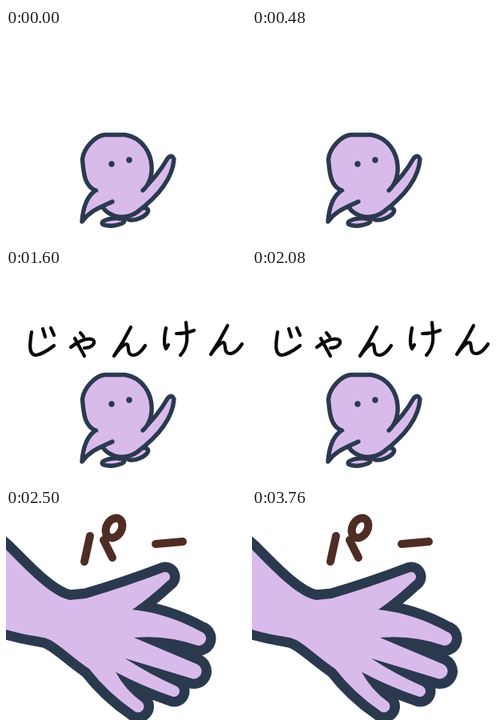
An HTML page for the animation above (4600 ms loop, 300 px wide and 265 px high).

```html
<!DOCTYPE html>
<html lang="ja">
<head>
<meta charset="utf-8">
<title>じゃんけん</title>
<style>
  html, body { margin: 0; width: 100%; height: 100%; overflow: hidden; background: #fff; }
  svg { display: block; width: 100vw; height: 100vh; stroke-linecap: round; stroke-linejoin: round; }
  .skin { fill: #d9bbeb; stroke: #2b394f; stroke-width: 5.4; }
  .dark { fill: #2b394f; }
  .light { fill: #d9bbeb; }
  .ink { fill: none; stroke: #080808; stroke-width: 4.2; }
  .brown { fill: none; stroke: #4f2d24; stroke-width: 10; }
  .palm { fill: #d9bbeb; stroke: #2b394f; stroke-width: 25; paint-order: stroke; }
  .scene { visibility: hidden; animation: 4600ms step-end infinite; }
  .up { animation-name: up; }
  .out { animation-name: out; }
  .jan { animation-name: jan; }
  .ken { animation-name: ken; }
  .rush { animation-name: rush; }
  .open { animation-name: open; }
  @keyframes up {
    0%, 34.7826% { visibility: visible; }
    17.3913%, 52.1739%, 100% { visibility: hidden; }
  }
  @keyframes out {
    0%, 34.7826%, 100% { visibility: hidden; }
    17.3913% { visibility: visible; }
  }
  @keyframes jan {
    0%, 52.1739%, 100% { visibility: hidden; }
    17.3913% { visibility: visible; }
  }
  @keyframes ken {
    0%, 52.1739%, 100% { visibility: hidden; }
    34.7826% { visibility: visible; }
  }
  @keyframes rush {
    0%, 54.3478%, 100% { visibility: hidden; }
    52.1739% { visibility: visible; }
  }
  @keyframes open {
    0% { visibility: hidden; }
    54.3478%, 100% { visibility: visible; }
  }
</style>
</head>
<body>
<svg viewBox="0 0 300 265" preserveAspectRatio="none">
  <defs>
    <g id="feet" class="skin">
      <ellipse cx="134" cy="242.5" rx="14" ry="4.5" transform="rotate(-6 134 242.5)"/>
      <ellipse cx="164.5" cy="232.5" rx="14" ry="6" transform="rotate(-22 164.5 232.5)"/>
    </g>
    <g id="head">
      <path class="skin" d="M112 203C99 198 97 184 95.5 164C97 150 112 134 124 133.5H149C171 137 181 157 182 172C183 184 179 196 171 203"/>
      <circle class="dark" cx="132" cy="170" r="3.7"/>
      <circle class="dark" cx="154" cy="165" r="3.7"/>
    </g>
    <path id="wing" class="skin" d="M112 203Q97 213 95 242C106 228 116 225 133 217"/>
    <path id="n" d="M156 74Q147 92 135 110Q148 92 152 96C154 101 151 109 160 109Q167 108 174 97"/>
  </defs>

  <g class="scene up">
    <use href="#feet"/>
    <path class="skin" d="M171 202Q190 184 202 163Q207 157 210 164C208 190 188 212 164 230C150 240 130 238 120 223L112 203"/>
    <use href="#head"/>
    <use href="#wing"/>
  </g>

  <g class="scene out">
    <use href="#feet"/>
    <path class="skin" d="M173 203Q198 202 220 193Q228 192 227 198C210 211 194 211 181 218C160 240 136 242 120 223L112 203"/>
    <use href="#head" x="2.5"/>
    <use href="#wing"/>
  </g>

  <g class="scene jan ink" role="img" aria-label="じゃん">
    <path d="M32 80C29 98 29 108 37 109Q46 108 60 97M46 76L49 86M56 75L60 84"/>
    <path d="M81 99Q97 87 107 89C114 91 109 100 98 100M93 81L97 86M86 88L98 110"/>
    <use href="#n"/>
  </g>
  <g class="scene ken ink" role="img" aria-label="けん">
    <path d="M200 75Q196 94 200 101L203 96M213 82Q225 82 235 78M225 68C227 88 228 98 218 109"/>
    <use href="#n" x="121" y="-2"/>
  </g>

  <g class="scene rush">
    <path class="dark fray" d="M-12 13H80C112 16 127 55 127 85C126 112 110 129 85 130C84 155 65 168 50 168C30 178 10 182-12 181"/>
    <path class="light fray" d="M-12 36C20 28 60 24 78 29C98 38 106 55 111 82C110 104 98 108 88 106L65 94H82Q74 78 56 75Q35 63 9 64L14 74L56 111Q72 126 68 142Q55 160 28 135L-12 105"/>
    <path class="light fray" d="M-12 118L10 132Q30 150 44 154Q30 160-12 140"/>
    <path class="light fray" d="M-12 148Q10 152 28 164Q10 168-12 163"/>
    <circle class="dark" cx="62" cy="64" r="4"/>
    <circle class="dark" cx="78" cy="92" r="4"/>
  </g>

  <g class="scene open">
    <path id="hand" class="palm"/>
    <g class="brown" role="img" aria-label="パー">
      <path d="M105 35L98 67M122 40L133 62M187 45L221 42"/>
      <ellipse cx="135" cy="25" rx="9.5" ry="13" transform="rotate(28 135 25)"/>
    </g>
  </g>
</svg>
<script>
  // One finger: a bent side, a round tip of radius r, and a bent side to the next gap.
  function finger(from, to, { tip: [x, y], r, bend }) {
    const dx = x - (from[0] + to[0]) / 2, dy = y - (from[1] + to[1]) / 2;
    const len = Math.hypot(dx, dy);
    const nx = dy / len, ny = -dx / len;
    const a = [x + nx * r, y + ny * r], b = [x - nx * r, y - ny * r];
    const mid = (p, q) => `${(p[0] + q[0]) / 2 + nx * bend} ${(p[1] + q[1]) / 2 + ny * bend}`;
    return `Q${mid(from, a)} ${a}A${r} ${r} 0 0 1 ${b}Q${mid(b, to)} ${to}`;
  }

  const gaps = [[100, 113], [158, 127], [160, 162], [149, 188], [137, 205], [104, 201]];
  const fingers = [
    { tip: [199, 86], r: 6, bend: -2 },
    { tip: [241, 163], r: 9, bend: 9 },
    { tip: [235, 204], r: 9.5, bend: 0 },
    { tip: [210, 229], r: 7, bend: -3 },
    { tip: [165, 248], r: 7.5, bend: -6 }
  ];
  document.getElementById('hand').setAttribute('d',
    'M-20 35L0 52C25 77 55 110 80 115L100 113' +
    fingers.map((f, i) => finger(gaps[i], gaps[i + 1], f)).join('') +
    'C80 185 62 165 47 162S10 157-20 145Z');

  let seed = 17;
  const rand = () => (seed = seed * 16807 % 2147483647) / 2147483647;

  // Diagonal speed streaks scattered along an edge.
  function fray(path) {
    const len = path.getTotalLength();
    let d = '';
    for (let s = 0; s < len; s += 1.5 + rand() * 4) {
      const p = path.getPointAtLength(s);
      const k = 2 + rand() ** 2 * 11;
      d += `M${p.x - k * 0.64} ${p.y - k * 0.77}l${k * 1.28} ${k * 1.54}`;
    }
    const streaks = document.createElementNS('http://www.w3.org/2000/svg', 'path');
    streaks.setAttribute('d', d);
    streaks.setAttribute('stroke', getComputedStyle(path).fill);
    streaks.setAttribute('stroke-width', 1.4);
    path.after(streaks);
  }
  document.querySelectorAll('.fray').forEach(fray);
</script>
</body>
</html>
```
